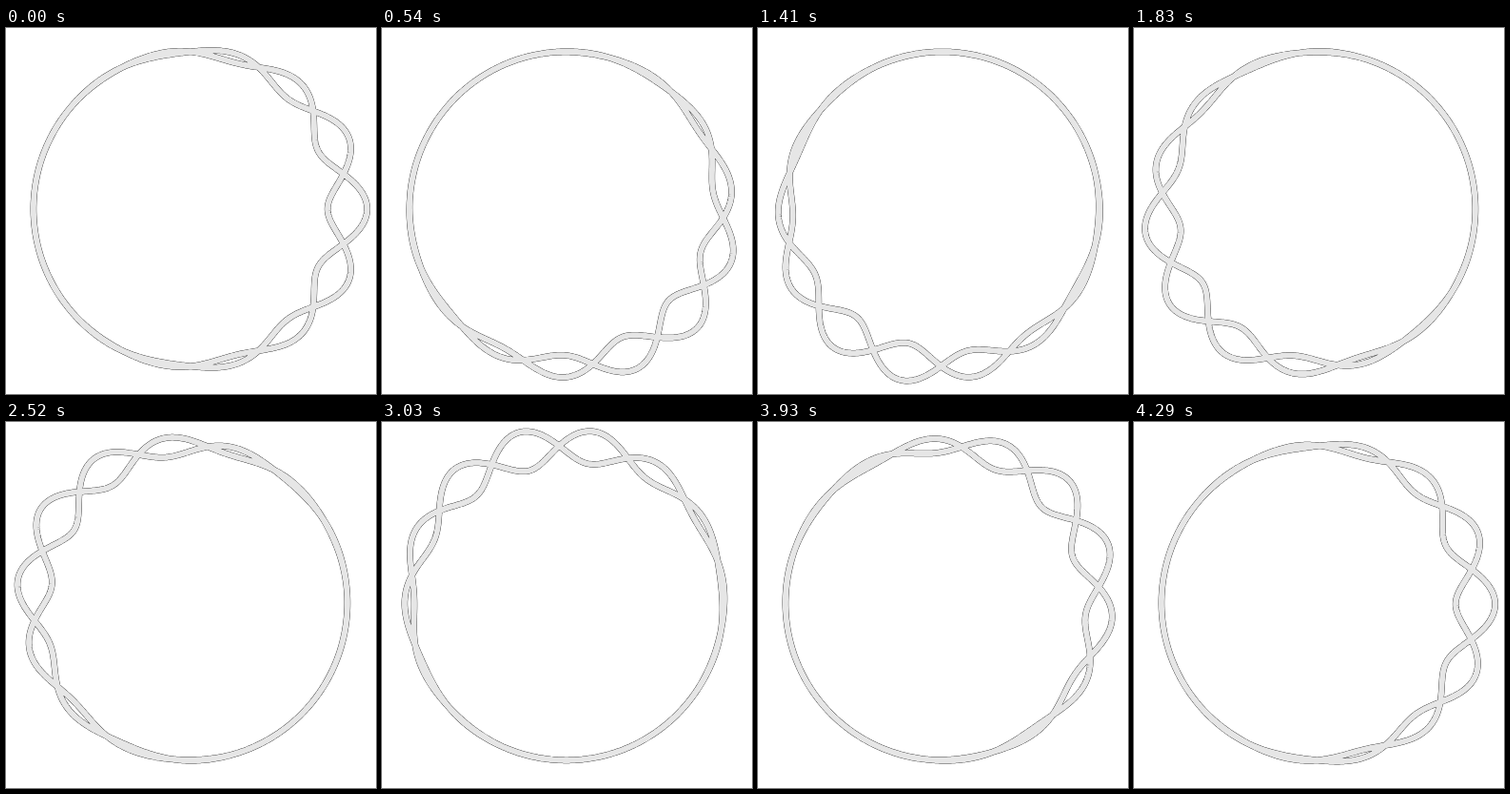
These frames come from a looping animation (389x384 px, 4320 ms). An HTML page with a canvas:

```html
<!DOCTYPE html>
<html lang="en">
<head>
<meta charset="utf-8">
<title>Braided ring</title>
<style>
  html, body { margin: 0; width: 100%; height: 100%; overflow: hidden; background: #fff; }
  canvas { display: block; }
</style>
</head>
<body>
<canvas id="stage" width="389" height="384"></canvas>
<script>
const ctx = document.getElementById('stage').getContext('2d');
const TAU = Math.PI * 2;
const LOOP = 4320, STEP = 30;
const CX = 193.9, CY = 189.9, RADIUS = 165;
const AMP = 20.8, WAVES = 7, FALLOFF = 0.85;
const POINTS = 720;

// Adds a circle with a ripple that fades away from the angle `peak`.
function addStrand(path, sign, peak, phase) {
  for (let i = 0; i < POINTS; i++) {
    const d = (i / POINTS - 0.5) * TAU;
    const a = peak + d;
    const r = RADIUS + sign * AMP * Math.exp(-FALLOFF * d * d) * Math.cos(WAVES * a + phase);
    const x = CX + r * Math.cos(a), y = CY + r * Math.sin(a);
    if (i) path.lineTo(x, y);
    else path.moveTo(x, y);
  }
  path.closePath();
}

function stroke(path, color, width) {
  ctx.strokeStyle = color;
  ctx.lineWidth = width;
  ctx.stroke(path);
}

function draw(now) {
  const time = Math.floor((now % LOOP) / STEP + 0.001) * STEP;
  const turn = time / LOOP;
  const braid = new Path2D();
  for (const sign of [1, -1]) addStrand(braid, sign, turn * TAU, turn * 3 * Math.PI);
  ctx.fillStyle = '#fff';
  ctx.fillRect(0, 0, 389, 384);
  ctx.lineJoin = 'round';
  stroke(braid, '#000', 6.5);
  stroke(braid, '#e6e6e6', 6);
}

function tick(now) {
  draw(now);
  requestAnimationFrame(tick);
}

draw(0);
requestAnimationFrame(tick);
</script>
</body>
</html>
```
